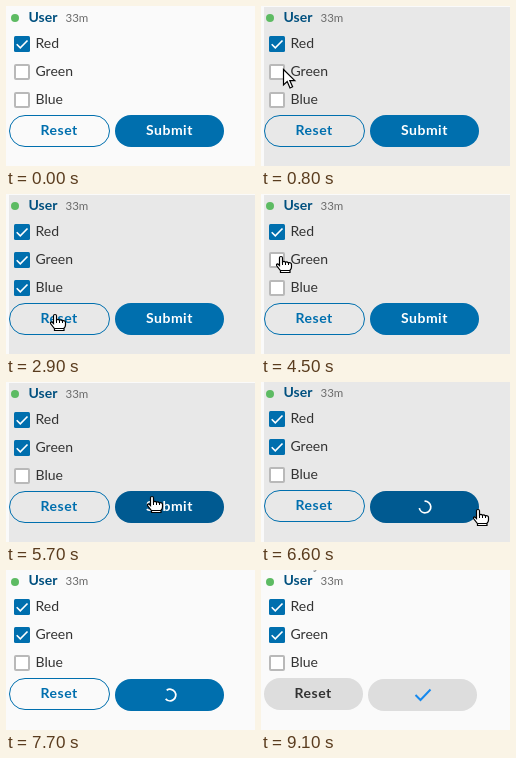
These frames come from a looping animation (249x160 px, 9700 ms). An HTML page with a canvas:

```html
<!DOCTYPE html>
<html lang="en">
<head>
<meta charset="utf-8">
<title>Card form</title>
<style>
html, body { margin: 0; width: 100%; height: 100%; overflow: hidden; background: #fafafa; }
canvas { display: block; }
</style>
</head>
<body>
<canvas id="stage" width="249" height="160"></canvas>
<script>
const ctx = document.getElementById('stage').getContext('2d');
const LOOP = 9700, STEP = 100;
const BLUE = '#006fae', DARK = '#005a91', GRAY = '#dddddd';

// Pointer tip: time, x, y, shape
const track = [
  [400, 190, 150, 'arrow'], [600, 92, 96, 'arrow'], [800, 22, 63, 'arrow'],
  [1000, 18, 61, 'hand'], [1400, 18, 61, 'hand'],
  [1600, 33, 66, 'hand'], [1800, 39, 77, 'arrow'], [2100, 22, 90, 'hand'],
  [2500, 22, 90, 'hand'], [2700, 40, 106, 'arrow'], [2900, 49, 120, 'hand'],
  [3900, 49, 120, 'hand'], [4100, 63, 101, 'arrow'], [4300, 42, 60, 'hand'],
  [4500, 20, 62, 'hand'], [4700, 17, 65, 'hand'], [5200, 17, 65, 'hand'],
  [5500, 80, 92, 'arrow'], [5700, 146, 114, 'hand'], [5900, 172, 122, 'hand'],
  [6400, 172, 122, 'hand'], [6600, 217, 127, 'hand'], [6700, 234, 130, 'arrow'],
  [6800, 252, 133, 'arrow']
];

function pointerAt(t) {
  if (t < track[0][0] || t >= 6800) return null;
  const i = track.findIndex(k => k[0] > t) - 1;
  const a = track[i], b = track[i + 1];
  const p = (t - a[0]) / (b[0] - a[0]);
  return {
    x: Math.round(a[1] + (b[1] - a[1]) * p),
    y: Math.round(a[2] + (b[2] - a[2]) * p),
    shape: a[3]
  };
}

function text(str, x, y, size, color, weight = 400, spacing = 0) {
  ctx.font = `${weight} ${size}px Lato, sans-serif`;
  ctx.letterSpacing = spacing + 'px';
  ctx.fillStyle = color;
  ctx.fillText(str, x, y);
}

function pill(x, y, w, h, fill, stroke) {
  ctx.beginPath();
  ctx.roundRect(x, y, w, h, h / 2);
  if (fill) { ctx.fillStyle = fill; ctx.fill(); }
  if (stroke) { ctx.strokeStyle = stroke; ctx.lineWidth = 1; ctx.stroke(); }
}

function line(points, color, width) {
  ctx.beginPath();
  points.forEach(([x, y]) => ctx.lineTo(x, y));
  ctx.strokeStyle = color;
  ctx.lineWidth = width;
  ctx.stroke();
}

function checkbox(y, label, on) {
  ctx.beginPath();
  if (on) {
    ctx.roundRect(8, y, 16, 16, 1.5);
    ctx.fillStyle = BLUE;
    ctx.fill();
    line([[10.7, y + 8.2], [14.3, y + 11.8], [21.5, y + 4.5]], '#fff', 1.6);
  } else {
    ctx.roundRect(9, y + 1, 14, 14, 1);
    ctx.fillStyle = '#fff';
    ctx.fill();
    ctx.strokeStyle = '#b9b9b9';
    ctx.lineWidth = 2;
    ctx.stroke();
  }
  text(label, 29.5, y + 12, 14, '#333');
}

function spinner(t) {
  const start = (-95 + (t - 6600) * 0.3) * Math.PI / 180;
  ctx.beginPath();
  ctx.arc(164, 125, 5.8, start, start + 4.6);
  ctx.strokeStyle = '#fff';
  ctx.lineWidth = 1.7;
  ctx.stroke();
}

const shapes = {
  arrow: new Path2D('M.5 .5V16L4.2 12.6L7 19L9.6 17.8L6.8 11.6H11.8Z'),
  hand: new Path2D('M-1.5 9.5V1.8Q-1.5 .5 0 .5Q1.5 .5 1.5 1.8V6Q3 4.8 4.5 6.2' +
    'Q6 5.2 7.3 6.8Q10.5 6.2 10.5 8.5V11Q10.5 13 9 14.2V16.5H-.5V14.6' +
    'L-4.3 9.8Q-5 8 -3.2 7.8Z')
};

function drawPointer({ x, y, shape }) {
  ctx.save();
  ctx.translate(x, y);
  ctx.fillStyle = '#fff';
  ctx.fill(shapes[shape]);
  ctx.strokeStyle = '#000';
  ctx.lineWidth = 1.2;
  ctx.stroke(shapes[shape]);
  if (shape === 'hand') {
    [1.5, 4.5, 7.5].forEach(f => line([[f, 6], [f, 9]], '#000', 1));
    line([[-.5, 14.5], [9, 14.5]], '#000', 1);
  }
  ctx.restore();
}

function buttons(t, up) {
  if (t >= 8200) {
    const done = t >= 8300;
    pill(3, 108, 99, 32, GRAY);
    pill(107, 109, 109, 32, GRAY);
    text('Reset', 33.5, 128, 14, '#333', 700, 0.5);
    if (done) line([[154.5, 125], [159.5, 130], [169.5, 119.5]], '#1689ee', 2);
    return;
  }
  pill(3.5, 109.5 - up, 100, 31, null, BLUE);
  text('Reset', 34.5, 129 - up, 14, BLUE, 700, 0.5);
  pill(109, 109, 109, 32, t >= 5700 && t < 6700 ? DARK : BLUE);
  if (t >= 6200) spinner(t);
  else text('Submit', 140, 129, 14, '#fff', 700, 0.5);
}

function draw(t) {
  const up = t >= 6200 ? 1 : 0;
  ctx.fillStyle = '#fafafa';
  ctx.fillRect(0, 0, 249, 160);
  if (t >= 400 && t < 6800) {
    ctx.fillStyle = '#e8e8e8';
    ctx.fillRect(3, 1 - up, 246, 160);
  }
  ctx.fillStyle = '#5dbb63';
  ctx.beginPath();
  ctx.arc(9, 12, 4, 0, 7);
  ctx.fill();
  text('User', 22.5, 16 - up, 14, '#00507f', 700);
  text('33m', 59.5, 16 - up, 11.5, '#6b6b6b');

  checkbox(30 - up, 'Red', true);
  checkbox(58 - up, 'Green', (t >= 1300 && t < 3500) || t >= 5000);
  checkbox(86 - up, 'Blue', t >= 2400 && t < 3500);
  buttons(t, up);

  if (t >= 9100) line([[52.5, 1], [54, 1.3], [55.5, 0]], '#666', 1);
  const pointer = pointerAt(t);
  if (pointer) drawPointer(pointer);
}

const began = performance.now();
function tick() {
  const t = (performance.now() - began) % LOOP;
  draw(Math.floor(t / STEP) * STEP);
  requestAnimationFrame(tick);
}
tick();
</script>
</body>
</html>
```
